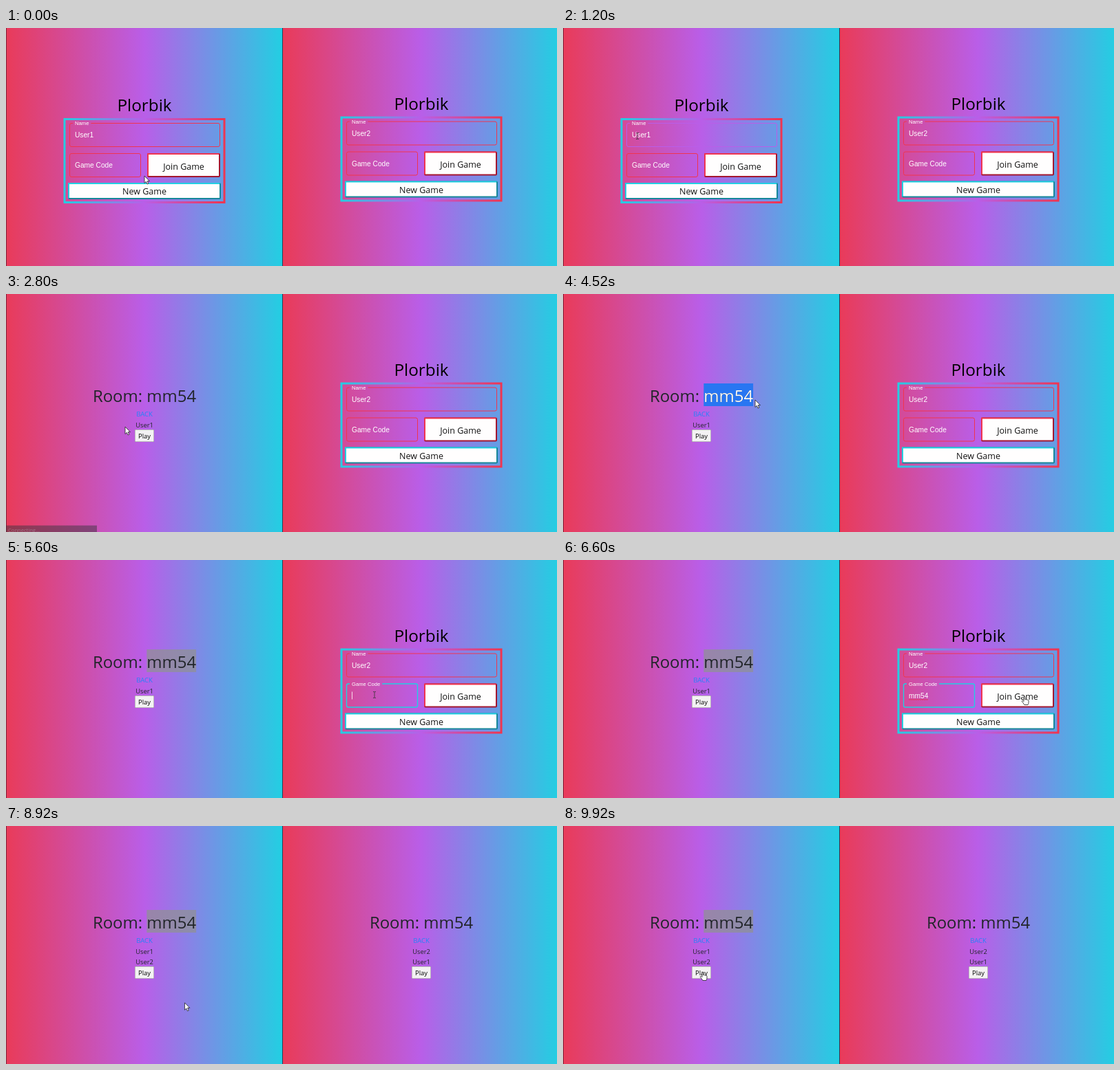
These frames come from a looping animation (800 by 346 pixels, 10 s). An HTML page with a canvas:

```html
<!DOCTYPE html>
<html lang="en">
<head>
<meta charset="utf-8">
<title>Plorbik</title>
<style>
html, body { margin: 0; width: 100%; height: 100%; overflow: hidden; }
canvas { display: block; width: 800px; height: 346px; }
</style>
</head>
<body>
<canvas id="stage" width="800" height="346"></canvas>
<script>
const ctx = document.getElementById('stage').getContext('2d');
const LOOP = 10000;
const RED = '#f0344f', VIOLET = '#b95ee8', CYAN = '#22cfe2';
const SANS = '"Open Sans", "Noto Sans", sans-serif';
const ARIAL = '"Liberation Sans", Arial, sans-serif';
const CODE = 'mm54';

// Moments at which something happens, in ms
const AT = { create: 2320, drag: 3720, focus: 5320, paste: 5720, join: 6800, joined: 8520 };

// Pointer path: time, x, y
const PATH = [
  [0, 201, 215], [320, 196, 212], [1120, 108, 157], [1320, 108, 157],
  [2120, 192, 235], [2400, 192, 235], [2800, 173, 193], [3100, 172, 190],
  [3600, 205, 152], [3720, 205, 152], [4320, 279, 154], [4600, 279, 154],
  [5200, 535, 196], [5800, 535, 196], [6520, 669, 198], [6920, 669, 198],
  [7500, 560, 262], [8000, 421, 212], [8500, 330, 282], [9100, 240, 250],
  [9700, 202, 212], [10000, 202, 212]
];

const clamp = v => Math.max(0, Math.min(1, v));
const smooth = v => v * v * (3 - 2 * v);
const mix = (a, b, k) => a + (b - a) * k;
const inside = (p, x, y, w, h) => p.x >= x && p.x <= x + w && p.y >= y && p.y <= y + h;

function pointerAt(t) {
  let i = 0;
  while (i < PATH.length - 2 && PATH[i + 1][0] <= t) i++;
  const [t0, x0, y0] = PATH[i], [t1, x1, y1] = PATH[i + 1];
  const k = smooth(clamp((t - t0) / (t1 - t0)));
  return { x: mix(x0, x1, k), y: mix(y0, y1, k) };
}

function text(s, x, y, font, color, align = 'left') {
  ctx.font = font;
  ctx.fillStyle = color;
  ctx.textAlign = align;
  ctx.fillText(s, x, y);
}

function rect(x, y, w, h, color) {
  ctx.fillStyle = color;
  ctx.fillRect(x, y, w, h);
}

function blend(x0, x1, colors) {
  const g = ctx.createLinearGradient(x0, 0, x1, 0);
  colors.forEach((c, i) => g.addColorStop(i / (colors.length - 1), c));
  return g;
}

function field(x, y, w, label, value, o = {}) {
  const lift = o.lift ?? 1;
  const size = mix(10.2, 7.65, lift);
  const h = 35;
  ctx.font = `${size}px ${ARIAL}`;
  const gap = lift > 0.5 ? ctx.measureText(label).width + 6 : 0;
  ctx.save();
  ctx.beginPath();
  ctx.rect(x - 2, y - 2, w + 4, h + 4);
  if (gap) ctx.rect(x + 5, y - 1, gap, 3);
  ctx.clip('evenodd');
  ctx.beginPath();
  ctx.roundRect(x + 0.5, y + 0.5, w - 1, h - 1, 2.5);
  ctx.strokeStyle = o.focus ? CYAN : o.hover ? VIOLET : RED;
  ctx.lineWidth = o.focus ? 1.4 : 1;
  ctx.stroke();
  ctx.restore();
  text(label, x + 8, mix(y + 21, y + 3, lift), `${size}px ${ARIAL}`, '#fff');
  text(value, x + 8, y + 21, `10.2px ${ARIAL}`, '#fff');
  if (!o.focus) return;
  const end = x + 8 + (value ? ctx.measureText(value).width : 0);
  if (value) {
    ctx.beginPath();
    for (let u = x + 8; u <= end; u++) ctx.lineTo(u, y + 23.5 + 0.5 * Math.sin(u * 2));
    ctx.strokeStyle = '#e8304a';
    ctx.lineWidth = 0.8;
    ctx.stroke();
  } else if (o.blink) {
    rect(end, y + 12, 0.8, 11, '#fff');
  }
}

function button(x, y, w, h, label, light, dark, base) {
  ctx.fillStyle = dark;
  ctx.beginPath();
  ctx.roundRect(x, y, w, h, 2);
  ctx.fill();
  ctx.fillStyle = light;
  ctx.beginPath();
  ctx.moveTo(x, y + h - 1);
  ctx.lineTo(x, y);
  ctx.lineTo(x + w - 1, y);
  ctx.lineTo(x + w - 3, y + 3);
  ctx.lineTo(x + 3, y + h - 3);
  ctx.fill();
  rect(x + 2, y + 2, w - 4, h - 4, '#fffefe');
  text(label, x + w / 2, base, `12.5px ${SANS}`, '#111', 'center');
}

function form(dx, dy, name, o) {
  ctx.save();
  ctx.translate(dx, dy);
  text('Plorbik', 201, 121, `500 24.3px ${SANS}`, '#000', 'center');
  ctx.strokeStyle = blend(83, 318, [CYAN, VIOLET, RED]);
  ctx.lineWidth = 3;
  ctx.strokeRect(85, 132.5, 232, 121);
  field(92, 138, 219, 'Name', name, { hover: o.nameHover });
  field(92, 182, 104, 'Game Code', o.code || '', o);
  button(205, 182, 106, 35, 'Join Game', RED, '#a4162f', 205.5);
  button(90, 225, 222, 24, 'New Game', CYAN, '#168799', 242);
  ctx.restore();
}

function room(dx, y, players, sel) {
  const font = `500 23.9px ${SANS}`;
  ctx.save();
  ctx.translate(dx, 0);
  ctx.font = font;
  const full = ctx.measureText('Room: ' + CODE).width;
  const left = 201 - full / 2;
  const start = left + ctx.measureText('Room: ').width;
  const picked = sel ? CODE.slice(0, sel.count) : '';
  const w = ctx.measureText(picked).width;
  if (w) rect(start, y - 27, w, 33, sel.active ? '#2876f2' : 'rgba(145,145,150,.75)');
  text('Room: ' + CODE, left, y, font, '#212529');
  if (w && sel.active) text(picked, start, y, font, '#fff');
  text('BACK', 201, y + 21, `9.5px ${SANS}`, '#2384f7', 'center');
  players.forEach((p, i) => text(p, 201, y + 36.5 + 15 * i, `9.4px ${SANS}`, '#212529', 'center'));
  const top = y + 25 + 15 * players.length;
  rect(187, top, 28, 18, '#858088');
  rect(187.5, top + 0.5, 27, 17, '#f3f2f3');
  text('Play', 201, top + 13, `9.4px ${SANS}`, '#000', 'center');
  ctx.restore();
}

function selection(t, p) {
  if (t < AT.drag) return null;
  const along = t < 4320 ? (p.x - 205) / 73 : 1;
  return { count: Math.round(clamp(along) * CODE.length), active: t < AT.focus };
}

function pane(x, w) {
  rect(x, 0, w, 346, blend(x, x + w, ['#e93b59', VIOLET, CYAN]));
}

function statusBar(t) {
  const alpha = 1 - clamp((t - 2520) / 560);
  if (t < AT.create || !alpha) return;
  ctx.save();
  ctx.globalAlpha = alpha;
  rect(0, 336.5, 132, 10, '#3a3440');
  text('Connecting...', 3, 346, `7.6px ${SANS}`, '#b5b0b8');
  ctx.restore();
}

function pointerKind(t, p) {
  const rightSide = p.x > 402;
  const inForm = rightSide ? t < AT.joined : t < AT.create;
  const q = rightSide ? { x: p.x - 402, y: p.y + (inForm ? 2.5 : 0) } : p;
  if (inForm) {
    if (inside(q, 205, 182, 106, 35) || inside(q, 90, 225, 222, 24)) return 'hand';
    if (inside(q, 92, 138, 219, 35) || inside(q, 92, 182, 104, 35)) return 'beam';
    return 'arrow';
  }
  const y = t < AT.joined ? 157 : 149;
  const top = y + (t < AT.joined ? 40 : 55);
  if (inside(q, 187, top, 28, 18) || inside(q, 189, y + 13, 24, 9)) return 'hand';
  return inside(q, 125, y - 27, 153, 33) ? 'beam' : 'arrow';
}

const SHAPES = {
  arrow: new Path2D('M0 0V10.5L2.4 8.3L4 12L5.8 11.2L4.2 7.6H7.4Z'),
  hand: new Path2D('M0 .8Q1-.6 1.8.8V4.8Q3 4.2 3.6 5Q4.8 4.5 5.4 5.4Q6.8 5 7 6.4V9Q7 10.5 6 12.5H.8Q-.6 9.8-2.6 7.8Q-2.8 6-1.4 6.4L0 7.6Z'),
  beam: new Path2D('M-2-4.5H-.6L0-4L.6-4.5H2M0-4V4M-2 4.5H-.6L0 4L.6 4.5H2')
};

function pointer(t, p) {
  const kind = pointerKind(t, p);
  ctx.save();
  ctx.translate(p.x, p.y);
  ctx.lineJoin = 'round';
  ctx.lineWidth = 0.8;
  ctx.strokeStyle = kind === 'beam' ? '#333' : '#222';
  ctx.fillStyle = '#fff';
  if (kind !== 'beam') ctx.fill(SHAPES[kind]);
  ctx.stroke(SHAPES[kind]);
  ctx.restore();
}

function draw(t) {
  const p = pointerAt(t);
  const joined = t >= AT.joined;
  pane(0, 402);
  pane(402, 401);

  if (t < AT.create) {
    form(0, 0, 'User1', {
      lift: 0,
      nameHover: inside(p, 92, 138, 219, 35),
      hover: inside(p, 92, 182, 104, 35)
    });
  } else {
    room(0, joined ? 149 : 157, joined ? ['User1', 'User2'] : ['User1'], selection(t, p));
  }

  if (joined) {
    room(402, 149, ['User2', 'User1']);
  } else {
    form(402, -2.5, 'User2', {
      lift: smooth(clamp((t - AT.focus) / 200)),
      focus: t >= AT.focus && t < AT.join,
      blink: (t - AT.focus) % 1000 < 500,
      hover: inside(p, 494, 179.5, 104, 35),
      code: t >= AT.paste ? CODE : ''
    });
  }

  rect(0, 0, 1, 346, 'rgba(40,20,35,.55)');
  rect(401, 0, 1, 346, 'rgba(35,30,55,.8)');
  statusBar(t);
  pointer(t, p);
}

// The picture steps ten times a second, in beats of 120 and 80 ms
function tick(now) {
  const t = now % LOOP;
  const beat = t % 200;
  draw(t - beat + (beat >= 120 ? 120 : 0));
  requestAnimationFrame(tick);
}
requestAnimationFrame(tick);
</script>
</body>
</html>
```
